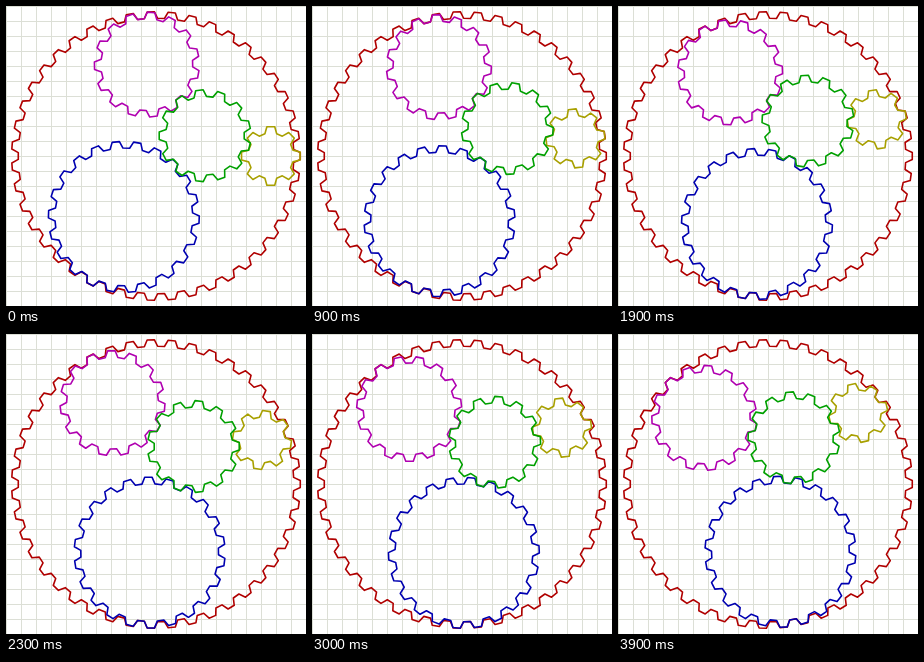
Animation of 300 by 300 pixels, one loop 4 s. Source, as an HTML page with a canvas:

```html
<!DOCTYPE html>
<html>
<head>
<meta charset="utf-8">
<style>
html, body { margin: 0; width: 100%; height: 100%; overflow: hidden; background: #fff; }
canvas { display: block; }
</style>
</head>
<body>
<canvas id="stage" width="300" height="300"></canvas>
<script>
const ctx = document.getElementById('stage').getContext('2d');
const TAU = Math.PI * 2, RAD = Math.PI / 180;
const CENTER = 150;
const UNIT = 3.28;            // pitch radius per tooth
const RING = 43, SUN = 13;    // tooth counts
const SUN_DIST = 16.164;      // sun offset in units, chosen so that all teeth mesh
const FRAME_MS = 100, FRAMES = 40, STEP = 0.98 * RAD;
const PLANETS = [
  { teeth: 22, side: -1, color: '#0000b0' },
  { teeth: 15, side: 1, color: '#b000b0' },
  { teeth: 8, side: -1, color: '#a8a000' }
];

// Angle at the ring's centre between the sun and a planet touching both.
function planetOffset({ teeth, side }) {
  const a = RING - teeth, b = SUN + teeth;
  return side * Math.acos((a * a + SUN_DIST ** 2 - b * b) / (2 * a * SUN_DIST));
}

function polar(angle, dist, x = CENTER, y = CENTER) {
  return [x + dist * Math.cos(angle), y - dist * Math.sin(angle)];
}

function drawGear([x, y], teeth, turn, color) {
  const pitch = TAU / teeth, r = teeth * UNIT, depth = UNIT;
  ctx.beginPath();
  for (let i = 0; i < teeth; i++) {
    for (const [phase, rise] of [[-0.17, 1], [0.17, 1], [0.33, -1], [0.67, -1]]) {
      ctx.lineTo(...polar(turn + (i + phase) * pitch, r + rise * depth, x, y));
    }
  }
  ctx.closePath();
  ctx.strokeStyle = color;
  ctx.stroke();
}

function drawGrid() {
  ctx.fillStyle = '#fff';
  ctx.fillRect(0, 0, 300, 300);
  ctx.fillStyle = '#dcdfd6';
  for (let p = 0; p <= 300; p += 15) {
    ctx.fillRect(p, 0, 1, 300);
    ctx.fillRect(0, p, 300, 1);
  }
}

const lead = -planetOffset(PLANETS[2]);

function draw(now) {
  const carrier = Math.floor(now / FRAME_MS) % FRAMES * STEP;
  const sunAngle = carrier + lead;
  drawGrid();
  ctx.lineWidth = 1.6;
  ctx.lineJoin = 'round';
  drawGear([CENTER, CENTER], RING, 0, '#b00000');
  for (const planet of PLANETS) {
    const { teeth, color } = planet;
    const angle = sunAngle + planetOffset(planet);
    drawGear(polar(angle, (RING - teeth) * UNIT), teeth, angle * (1 - RING / teeth), color);
  }
  drawGear(polar(sunAngle, SUN_DIST * UNIT), SUN, sunAngle * (RING + SUN) / SUN, '#00a000');
}

function tick() {
  draw(performance.now());
  requestAnimationFrame(tick);
}
tick();
</script>
</body>
</html>
```
